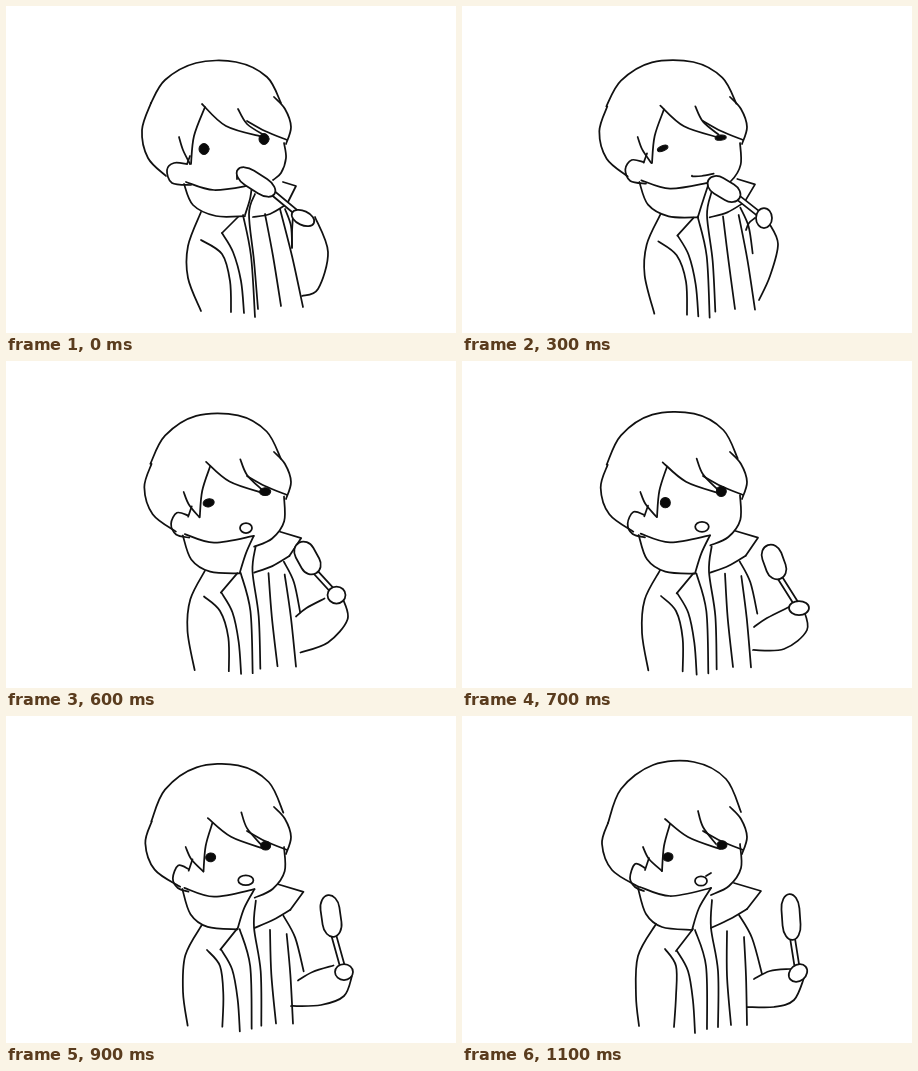
An HTML page that plays this animation: 450 px wide and 327 px high, repeating every 1.2 s.

```html
<!DOCTYPE html>
<html lang="en">
<head>
<meta charset="utf-8">
<title>Ice pop</title>
<style>
html, body { margin: 0; width: 100%; height: 100%; overflow: hidden; background: #fff; }
svg { display: block; width: 100%; height: 100%; }
svg * { fill: none; stroke: #111; stroke-width: 1.75; stroke-linecap: round; stroke-linejoin: round; }
svg .solid { fill: #fff; }
svg .eye { fill: #0a0a0a; stroke-width: 1; }
</style>
</head>
<body>
<svg id="stage" viewBox="0 0 450 327"></svg>
<script>
const STEP = 100, STEPS = 12, LAST = 6;
const stage = document.getElementById('stage');
const parts = [];

const add = (tag, cls = '') => {
  const el = document.createElementNS('http://www.w3.org/2000/svg', tag);
  el.setAttribute('class', cls);
  return stage.appendChild(el);
};
const set = (el, attrs) => Object.entries(attrs).forEach(([k, v]) => el.setAttribute(k, v));
const place = (x, y, turn) => `translate(${x} ${y}) rotate(${turn})`;
const parse = text => text.split('|').map(key => key.trim().split(/[ ,]+/).map(Number));

// Keys are spread evenly over the poses from start to end.
function sample(keys, pose, start = 0, end = LAST) {
  const t = (pose - start) / (end - start) * (keys.length - 1);
  const i = Math.max(0, Math.min(keys.length - 1, Math.floor(t)));
  const next = keys[Math.min(i + 1, keys.length - 1)];
  return keys[i].map((v, k) => v + (next[k] - v) * (t - i));
}

// Smooth curve through the points.
function trace(n, tension) {
  const count = n.length / 2;
  const at = i => {
    const j = 2 * Math.max(0, Math.min(count - 1, i));
    return [n[j], n[j + 1]];
  };
  let d = 'M' + at(0);
  for (let i = 0; i < count - 1; i++) {
    const [a, b, c, e] = [at(i - 1), at(i), at(i + 1), at(i + 2)];
    const h1 = b.map((v, k) => v + (c[k] - a[k]) * tension);
    const h2 = c.map((v, k) => v - (e[k] - b[k]) * tension);
    d += `C${h1} ${h2} ${c}`;
  }
  return d;
}

function part(el, text, draw, start = 0, end = LAST) {
  parts.push({ el, keys: parse(text), draw, start, end });
}
function line(text, { start, end, tension = 1 / 6 } = {}) {
  const el = add('path');
  part(el, text, n => set(el, { d: trace(n, tension) }), start, end);
}
function oval(text, cls, start) {
  const el = add('ellipse', cls);
  part(el, text, ([x, y, rx, ry, turn = 0]) =>
    set(el, { rx, ry, transform: place(x, y, turn) }), start);
}

// Hair
line('145,97 136,124 142,152 160,170 | 146,107 140,128 150,154 177,171');
line(`145,97 159,74 190,57 230,56 261,71 275,97 | 144,102 159,75 190,56 232,56 260,72 274,98
 | 146,107 159,73 191,49 232,46 264,63 279,96`);
line('268,91 279,103 285,121 280,138');
line('199,101 188,130 185,158 | 208,108 202,130 200,155');
line('173,131 177,144 184,158 | 181,131 187,143 200,155');
line('181,158 184,150 | 183,154 187,142');
line('196,98 220,120 257,131 | 203,103 226,121 258,133');
line('232,103 241,118 258,129 | 236,95 241,111 254,128');
line('241,115 259,125 281,134');

// Face
line(`278,137 280,152 275,167 267,174 | 278,137 278,162 266,179 248,187
 | 278,128 279,152 267,170 249,179`);
line('181,158 168,157 161,164 166,177 185,179 | 183,152 173,148 168,162 173,171 182,175');
const eyeHeight = parse('5.5 | 5.3 | 2.6 | 2.7 | 5.2 | 4.4 | 4.3');
function eye(text, tilt) {
  const el = add('ellipse', 'eye');
  part(el, text, ([x, y], pose) => {
    const [ry] = sample(eyeHeight, pose);
    const rx = ry < 4 ? 5.6 : 5;
    set(el, { rx, ry, transform: place(x, y, (ry - 5.5) * tilt) });
  });
}
eye('198,143 | 206,141', 8);
eye('258,133 | 260,129', 2);
line('231,173 231,165', { end: 1 });
line('230,168 230,172 240,170 252,167 | 230,173 232,167 239,170 251,169', { start: 1.5, end: 3 });
oval('240,167 6,5 | 240,164 8,5 | 239,165 6,4.7', '', 3.5);
line('244,160 249,157', { start: 5.5 });

// Collar
line('180,176 208,184 246,179 | 178,171 208,180 249,172');
line('178,178 187,199 210,210 239,210 | 176,172 184,198 200,211 230,214');
line('246,179 244,193 239,209 | 249,172 237,192 230,214');
line('277,176 290,180 281,198 | 272,167 299,175 285,193', { tension: 0 });
line('247,211 264,208 281,198 | 249,212 268,203 285,193');

// Coat
line(`195,206 182,240 182,272 195,305 | 200,210 186,238 183,268 191,309
 | 194,208 176,240 174,280 177,310`);
line(`195,234 216,248 224,275 225,306 | 197,236 214,250 224,276 225,310
 | 203,233 214,250 214,280 212,311`);
line('232,211 216,227 | 231,213 214,235');
line('216,227 227,246 235,275 238,307 | 215,235 226,255 231,285 233,317');
line('237,209 245,250 249,311 | 233,214 244,250 245,313');
line('249,188 243,208 248,255 252,303 | 250,184 249,212 256,255 256,311');
line('259,208 267,250 275,300 | 265,215 265,260 269,309');
line('274,203 286,250 297,301 | 282,221 284,260 285,309');

// Arm
line('279,203 285,220 286,242 | 277,199 290,222 300,258');
line(`309,211 322,246 312,283 296,290 | 309,209 322,242 313,282 293,287
 | 307,217 316,238 308,270 297,294 | 333,229 338,248 322,275 298,294
 | 341,247 345,269 322,288 291,289 | 346,260 338,280 315,289 285,290
 | 342,262 332,284 312,291 285,291`);
line(`286,241 286,226 287,210 | 284,224 287,217 293,212
 | 292,266 305,257 327,246 | 292,263 308,255 328,253`);

// Ice pop: centre, angle, half length, half width; the stick points at the hand.
const grip = `297,212 12,7 25 | 298,211 9,7 40 | 302,212 8,10 0 | 324,221 8,10 0
 | 337,247 10,7 0 | 338,256 9,8 0 | 336,257 10,8 -40`;
const gripKeys = parse(grip);
const stick = add('rect', 'solid');
const pop = add('rect', 'solid');
part(pop, `250,176 33 22,8.5 | 251,176 30 21,8.5 | 262,183 31 18,9 | 291,193 52 17,10
 | 312,201 70 18,10 | 325,200 82 21,9.5 | 329,201 86 23,9`, ([x, y, turn, long, wide], pose) => {
  const a = turn * Math.PI / 180;
  const ex = x + Math.cos(a) * (long - 2), ey = y + Math.sin(a) * (long - 2);
  const [hx, hy] = sample(gripKeys, pose);
  set(pop, { x: -long, y: -wide, width: 2 * long, height: 2 * wide,
    rx: long * 0.65, ry: wide, transform: place(x, y, turn) });
  set(stick, { y: -2.4, width: Math.hypot(hx - ex, hy - ey), height: 4.8,
    transform: place(ex, ey, Math.atan2(hy - ey, hx - ex) * 180 / Math.PI) });
});
oval(grip, 'solid');

// The first pose lasts one step, then each pose is followed by an in-between.
function render(time) {
  const step = Math.floor(time / STEP) % STEPS;
  const pose = step ? (step + 1) / 2 : 0;
  for (const { el, keys, draw, start, end } of parts) {
    const shown = pose >= start && pose <= end;
    el.style.display = shown ? '' : 'none';
    if (shown) draw(sample(keys, pose, start, end), pose);
  }
}

const begin = performance.now();
function tick() {
  render(performance.now() - begin);
  requestAnimationFrame(tick);
}
tick();
</script>
</body>
</html>
```
